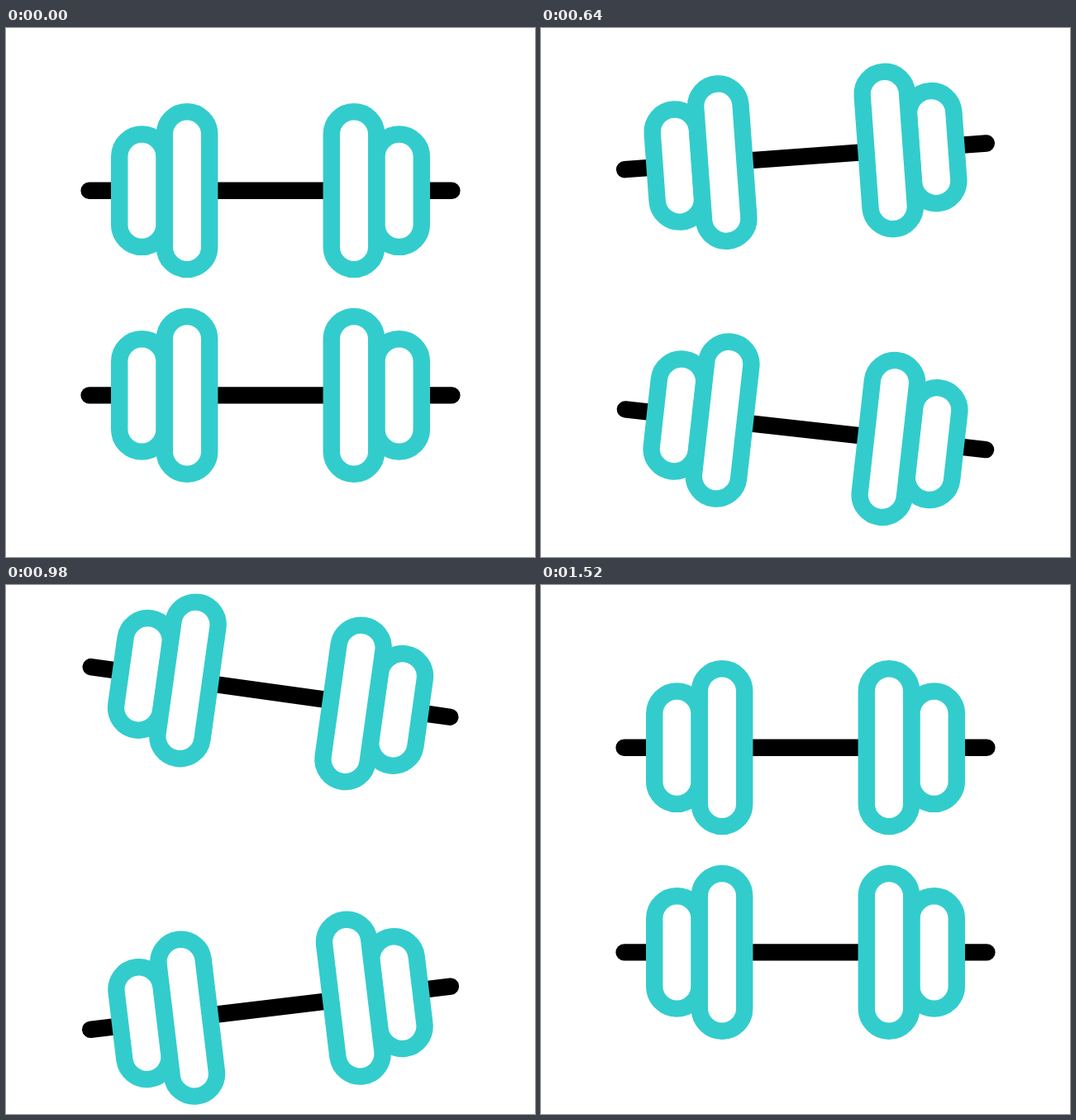
Write an HTML page that moves like this. It is 640x640 px and loops after 2.74 s.

```html
<!DOCTYPE html>
<html lang="en">
<head>
<meta charset="utf-8">
<title>Dumbbells</title>
<style>
  html, body {
    margin: 0;
    width: 100%;
    height: 100%;
    overflow: hidden;
    background: #fff;
  }
  svg { display: block; width: 100vw; height: 100vh; }

  .bar { stroke: #000; stroke-width: 20.4; stroke-linecap: round; }
  .plate { fill: #fff; stroke: #3cc; stroke-width: 20.4; }

  .upper, .lower {
    transform-origin: 0 0;
    animation: 2740ms cubic-bezier(.3333, 0, .6667, 1) infinite;
  }
  .upper { --lift: -1px; animation-name: move, tilt-upper; }
  .lower { --lift: 1px; animation-name: move, tilt-lower; }

  /* lift 460-780 ms, hold, drop from 960 ms, settle by 1520 ms */
  @keyframes move {
    0%, 16.788% { translate: 0 0; }
    28.467%, 35.036% { translate: 0 calc(var(--lift) * 69.2); }
    42.336% { translate: 0 calc(var(--lift) * 7.6); }
    55.474%, 100% { translate: 0 0; }
  }
  @keyframes tilt-upper {
    0%, 16.788% { rotate: 0deg; }
    28.467% { rotate: -6.93deg; }
    35.036% { rotate: 8.2deg; }
    42.336%, 100% { rotate: 0deg; }
  }
  @keyframes tilt-lower {
    0%, 16.788% { rotate: 0deg; }
    26.277%, 28.467% { rotate: 8.19deg; }
    35.036% { rotate: -7.05deg; }
    42.336%, 100% { rotate: 0deg; }
  }
</style>
</head>
<body>
<svg viewBox="0 0 640 640">
  <defs>
    <g id="plates">
      <rect class="plate" x="-182.8" y="-68.2" width="54.4" height="136.4" rx="27.2"/>
      <rect class="plate" x="-128.2" y="-95.4" width="54.4" height="190.8" rx="27.2"/>
    </g>
    <g id="dumbbell">
      <path class="bar" d="M-219.4 0H219.4"/>
      <use href="#plates"/>
      <use href="#plates" transform="scale(-1 1)"/>
    </g>
  </defs>
  <g transform="translate(320 196.7)">
    <g class="upper"><use href="#dumbbell"/></g>
  </g>
  <g transform="translate(320 444.4)">
    <g class="lower"><use href="#dumbbell"/></g>
  </g>
</svg>
</body>
</html>
```
